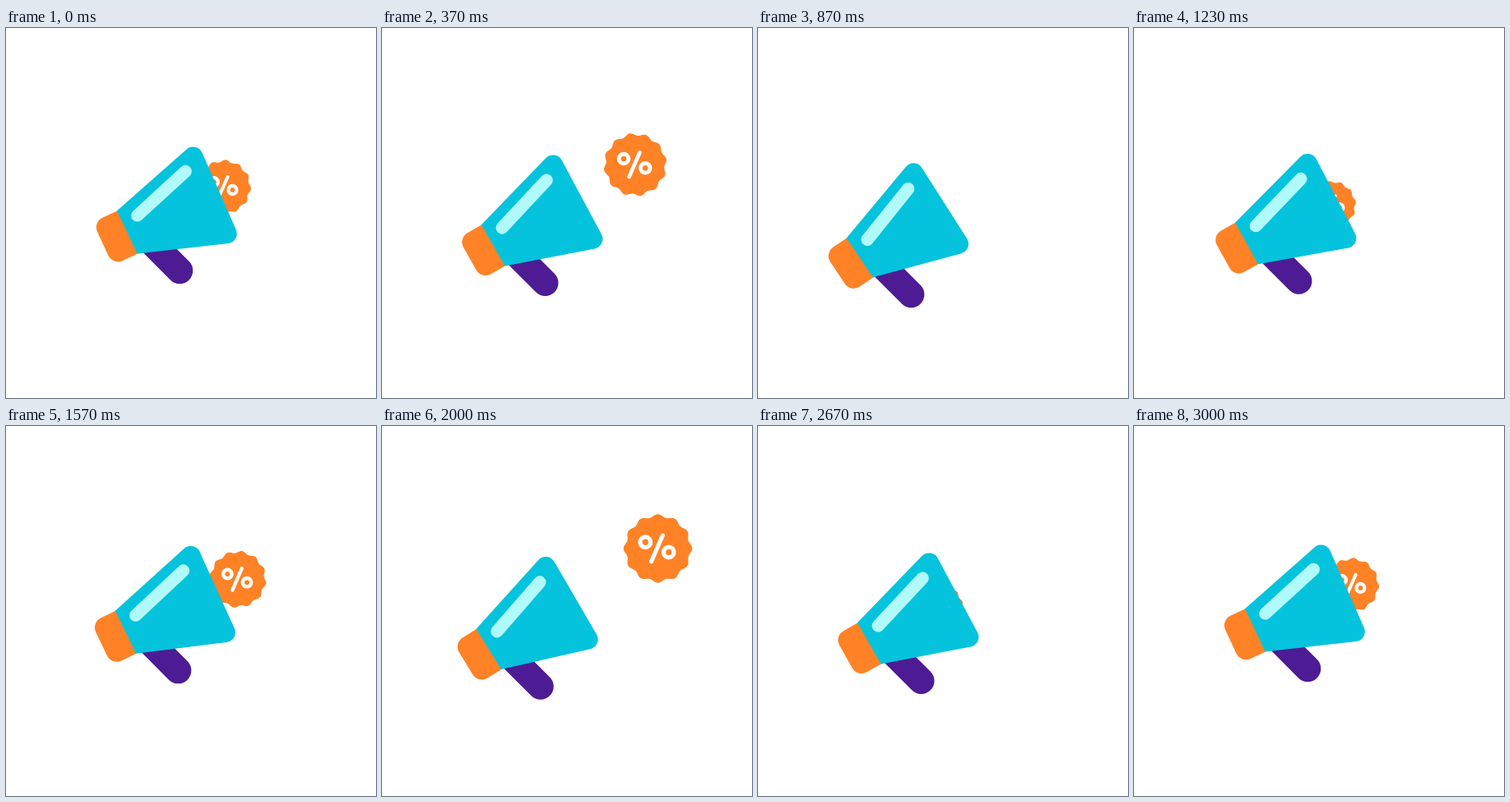
An HTML page for the animation above (3.07 s loop, 450 px wide and 450 px high).

```html
<!DOCTYPE html>
<html lang="en">
<head>
<meta charset="utf-8">
<title>Megaphone</title>
<style>
  html, body { margin: 0; width: 100%; height: 100%; overflow: hidden; background: #fff; }
  svg { display: block; width: 100vw; height: 100vh; }
</style>
</head>
<body>
<svg viewBox="0 0 450 450">
  <g id="badge">
    <path id="seal" fill="#ff8226"/>
    <g fill="none" stroke="#fff" stroke-linecap="round">
      <circle cx="-14" cy="-7.2" r="5.8" stroke-width="4.9"/>
      <circle cx="12.2" cy="4.1" r="5.8" stroke-width="4.9"/>
      <path d="M-7.4 14.7 5.4-14.7" stroke-width="4.7"/>
    </g>
  </g>
  <path id="handle" d="M175 258.8 211.3 295.1" stroke="#4d1c95" stroke-width="32" stroke-linecap="round"/>
  <g id="horn">
    <path id="neck" fill="#ff8226"/>
    <path id="cone" fill="#05c3dc"/>
    <path d="M159.8 228 218.3 174.4" stroke="#b1fafc" stroke-width="15.2" stroke-linecap="round"/>
  </g>
</svg>
<script>
const LOOP = 3070, STEP = 100 / 3, BADGE_RADIUS = 38.5;
const [badge, seal, handle, horn, neck, cone] =
  ['badge', 'seal', 'handle', 'horn', 'neck', 'cone'].map(id => document.getElementById(id));

// Polygon whose corners [x, y, radius] are rounded by arcs.
function roundedPolygon(corners) {
  const count = corners.length;
  const parts = corners.map(([x, y, radius], i) => {
    const toward = j => {
      const [px, py] = corners[(j + count) % count];
      const length = Math.hypot(px - x, py - y);
      return [(px - x) / length, (py - y) / length];
    };
    const a = toward(i - 1), b = toward(i + 1);
    const angle = Math.acos(a[0] * b[0] + a[1] * b[1]);
    const cut = radius / Math.tan(angle / 2);
    return `${x + a[0] * cut} ${y + a[1] * cut}` +
      `A${radius} ${radius} 0 0 1 ${x + b[0] * cut} ${y + b[1] * cut}`;
  });
  return 'M' + parts.join('L') + 'Z';
}

function scallop(radius, depth, bumps) {
  const points = [];
  for (let i = 0; i < bumps * 14; i++) {
    const a = i / 14 / bumps * 2 * Math.PI;
    const r = radius - depth * (1 - Math.cos(a * bumps));
    points.push(`${(r * Math.sin(a)).toFixed(2)} ${(-r * Math.cos(a)).toFixed(2)}`);
  }
  return 'M' + points.join('L') + 'Z';
}

cone.setAttribute('d', roundedPolygon([[135, 222.2, 0], [232, 136.6, 12], [286.3, 260.3, 12], [159.6, 274.5, 0]]));
neck.setAttribute('d', roundedPolygon([[136, 222, 0], [160.6, 274.2, 0], [130, 288.5, 13], [105.6, 236.3, 13]]));
seal.setAttribute('d', scallop(BADGE_RADIUS, 1.6, 12));

// Straight flights of the badge: full size and place (x, y) at frame `mid`, gone from `end` on.
const flights = [
  { mid: 11, end: 24, x: 308, y: 166.2, vx: 4.3, vy: -2.72 },
  { mid: 54, end: 66, x: 310.8, y: 166.3, vx: 4.115, vy: -2.88 },
  { mid: 100, end: 113, x: 308, y: 166.2, vx: 4.3, vy: -2.72 }
];

function render(time) {
  const n = Math.min(90, Math.max(1, Math.floor((time % LOOP + 3.5) / STEP)));

  const phase = (n - 1) % 44.5;
  const swing = Math.min(phase, 44.5 - phase);
  const shift = `translate(${-1.28 * swing} ${1.49 * swing})`;
  handle.setAttribute('transform', shift);
  horn.setAttribute('transform', `${shift} rotate(${-0.45 * swing} 161 240)`);

  const { mid, x, y, vx, vy } = flights.find(flight => n < flight.end);
  const d = n - mid;
  badge.setAttribute('visibility', d > -22 ? 'visible' : 'hidden');
  badge.setAttribute('transform',
    `translate(${x + vx * d} ${y + vy * d}) scale(${1 + 0.54 * d / BADGE_RADIUS})`);
  seal.setAttribute('transform', `rotate(${20 + 1.65 * d})`);
}

const start = performance.now();
function tick() {
  render(performance.now() - start);
  requestAnimationFrame(tick);
}
tick();
</script>
</body>
</html>
```
